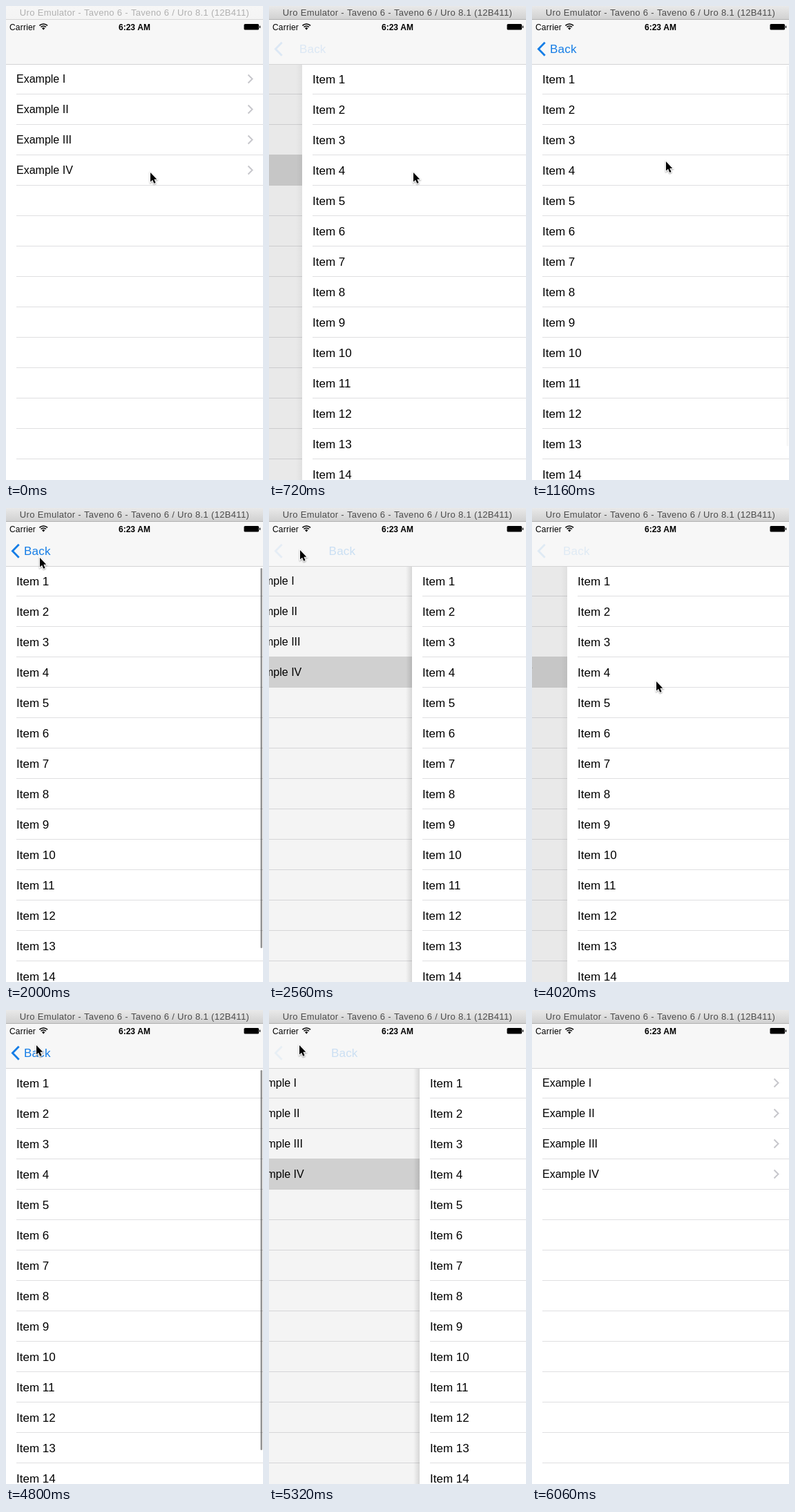
Write an HTML page with a canvas that moves like this. It is 372x686 px and loops after 6.84 s.

```html
<!DOCTYPE html>
<html lang="en">
<head>
<meta charset="utf-8">
<style>
  html, body { margin: 0; width: 372px; height: 686px; overflow: hidden; background: #fff; }
  canvas { display: block; }
</style>
</head>
<body>
<canvas id="stage" width="372" height="686"></canvas>
<script>
const ctx = document.getElementById('stage').getContext('2d');
const W = 372, H = 686, LOOP = 6840, ROW = 44, NAV_BOTTOM = 85;
const FONT = '"Liberation Sans", Arial, sans-serif';
const BLUE = '#157de6';
const WINDOW_ACTIVE = 280;
const VISITS = [{ push: 393, pop: 2390 }, { push: 3700, pop: 5140 }];

// Pointer stops: time, x, y of the tip
const POINTER = [
  [0, 209, 241], [1000, 209, 241], [1850, 49, 72], [2150, 49, 72], [2350, 45, 61],
  [2800, 45, 61], [3450, 180, 251], [4050, 180, 251], [4700, 44, 51], [5400, 44, 51], [5750, -14, 70]
];

const ramp = (t, from, to) => Math.min(1, Math.max(0, (t - from) / (to - from)));
const smooth = p => p * p * (3 - 2 * p);

// Critically damped spring, time in ms
function spring(t) {
  if (t <= 0) return 0;
  if (t > 720) return 1;
  const a = t * 0.0109;
  return 1 - (1 + a) * Math.exp(-a);
}

function rect(x, y, w, h, color) {
  ctx.fillStyle = color;
  ctx.fillRect(x, y, w, h);
}

function text(str, x, y, size, { color = '#000', weight = '', align = 'left', spacing = 0 } = {}) {
  ctx.font = `${weight} ${size}px ${FONT}`;
  ctx.textAlign = align;
  ctx.letterSpacing = spacing + 'px';
  ctx.fillStyle = color;
  ctx.fillText(str, x, y);
}

function line(points, width, color) {
  ctx.beginPath();
  points.forEach(([x, y]) => ctx.lineTo(x, y));
  ctx.lineWidth = width;
  ctx.strokeStyle = color;
  ctx.stroke();
}

function separators() {
  for (let y = 127; y < H; y += ROW) rect(15, y, W, 1, '#dfdfe1');
}

function drawExamples(offset, dim, highlight) {
  ctx.save();
  ctx.translate(offset, 0);
  rect(0, 20, W, H, '#fff');
  separators();
  if (highlight > 0) rect(0, 215, W, 45, `rgba(217,217,217,${highlight})`);
  ['I', 'II', 'III', 'IV'].forEach((numeral, i) => {
    const y = 105 + i * ROW;
    text('Example ' + numeral, 15, y + 6, 16);
    line([[350.5, y - 5.5], [356.5, y + 0.5], [350.5, y + 6.5]], 2, '#c7c7cc');
  });
  ctx.restore();
  rect(0, 20, W, H, `rgba(0,0,0,${dim})`);
}

function drawItems(x, indicator) {
  ctx.save();
  ctx.translate(x, 0);
  if (x > 0) {
    const shadow = ctx.createLinearGradient(-9, 0, 0, 0);
    shadow.addColorStop(0, 'rgba(0,0,0,0)');
    shadow.addColorStop(1, `rgba(0,0,0,${0.12 * Math.min(1, x / 150)})`);
    rect(-9, 20, 9, H, shadow);
  }
  rect(0, 20, W, H, '#fff');
  separators();
  for (let i = 0; i < 14; i++) text('Item ' + (i + 1), 15, 112 + i * ROW, 17);
  if (indicator > 0) {
    ctx.fillStyle = `rgba(0,0,0,${0.42 * indicator})`;
    ctx.beginPath();
    ctx.roundRect(368.4, 87, 2.6, 550, 1.3);
    ctx.fill();
  }
  ctx.restore();
}

function drawStatusBar() {
  text('Carrier', 5, 35, 12, { spacing: 0.2 });
  text('6:23 AM', 186, 35, 12, { weight: 'bold', align: 'center' });
  for (const r of [8.2, 5.2]) {
    ctx.beginPath();
    ctx.arc(54.2, 34.2, r, -Math.PI * 0.75, -Math.PI * 0.25);
    ctx.lineWidth = 1.7;
    ctx.strokeStyle = '#000';
    ctx.stroke();
  }
  ctx.fillStyle = '#000';
  ctx.beginPath();
  ctx.moveTo(54.2, 34.8);
  ctx.arc(54.2, 34.2, 3, -Math.PI * 0.75, -Math.PI * 0.25);
  ctx.fill();
  ctx.beginPath();
  ctx.roundRect(344.5, 26, 21.5, 8.5, 1.5);
  ctx.roundRect(366.8, 28.5, 1.4, 3.5, 0.7);
  ctx.fill();
}

function drawNavBar(back) {
  rect(0, 20, W, 64, '#f7f7f7');
  rect(0, NAV_BOTTOM - 1, W, 1, '#d4d4d5');
  drawStatusBar();
  ctx.globalAlpha = back.chevron;
  line([[18.7, 52.8], [9.4, 62.3], [18.7, 71.8]], 2.8, BLUE);
  ctx.globalAlpha = back.label;
  text('Back', 26 + back.shift, 68, 17, { color: BLUE, spacing: 0.2 });
  ctx.globalAlpha = 1;
}

function drawTitleBar(active) {
  const fill = ctx.createLinearGradient(0, 0, 0, 20);
  fill.addColorStop(0, active ? '#e9e9e9' : '#f6f6f6');
  fill.addColorStop(1, active ? '#d0d0d0' : '#f4f4f4');
  rect(0, 0, W, 20, fill);
  rect(0, 19, W, 1, active ? '#b1b1b1' : '#d6d6d6');
  text('Uro Emulator - Taveno 6 - Taveno 6 / Uro 8.1 (12B411)', W / 2, 14, 13,
    { color: active ? '#4b4b4b' : '#b0b0b0', align: 'center', spacing: 0.33 });
}

function drawPointer(t) {
  const next = POINTER.findIndex(stop => stop[0] > t);
  if (next < 0) return;
  const [t0, x0, y0] = POINTER[next - 1], [t1, x1, y1] = POINTER[next];
  const p = smooth(ramp(t, t0, t1));
  ctx.save();
  ctx.translate(x0 + (x1 - x0) * p, y0 + (y1 - y0) * p);
  const arrow = new Path2D('M0 0V13.5L3.1 10.7L5.3 15.8L7.6 14.8L5.4 9.8H9.3Z');
  ctx.shadowColor = 'rgba(0,0,0,.4)';
  ctx.shadowBlur = 2;
  ctx.shadowOffsetY = 1;
  ctx.lineWidth = 2;
  ctx.strokeStyle = '#fff';
  ctx.stroke(arrow);
  ctx.shadowColor = 'transparent';
  ctx.fillStyle = '#000';
  ctx.fill(arrow);
  ctx.restore();
}

function backButton(sincePush, sincePop, open) {
  if (sincePop < 0) {
    const alpha = ramp(sincePush, 290, 600) * (1 - 0.7 * ramp(sincePop, -90, -50));
    return { label: alpha, chevron: alpha, shift: 140 * (1 - open) };
  }
  return {
    label: 0.3 * (1 - ramp(sincePop, 0, 500)),
    chevron: 0.3 * (1 - ramp(sincePop, 0, 230)),
    shift: 109 * (1 - open)
  };
}

function draw(t) {
  const visit = t < VISITS[1].push - 60 ? VISITS[0] : VISITS[1];
  const sincePush = t - visit.push, sincePop = t - visit.pop;
  const open = spring(sincePush) - spring(sincePop);
  const highlight = sincePush < -60 ? 0 : 1 - ramp(sincePop, 470, 720);
  const indicator = ramp(sincePush, 760, 860) - ramp(sincePush, 1750, 1980);

  if (open < 1) drawExamples(-0.3 * W * open, 0.1 * open, highlight);
  if (open > 0) drawItems(Math.round(W * (1 - open)), indicator);
  drawNavBar(backButton(sincePush, sincePop, open));
  drawTitleBar(t >= WINDOW_ACTIVE);
  drawPointer(t);
}

const start = performance.now();
function frame() {
  draw((performance.now() - start) % LOOP);
  requestAnimationFrame(frame);
}
frame();
</script>
</body>
</html>
```
